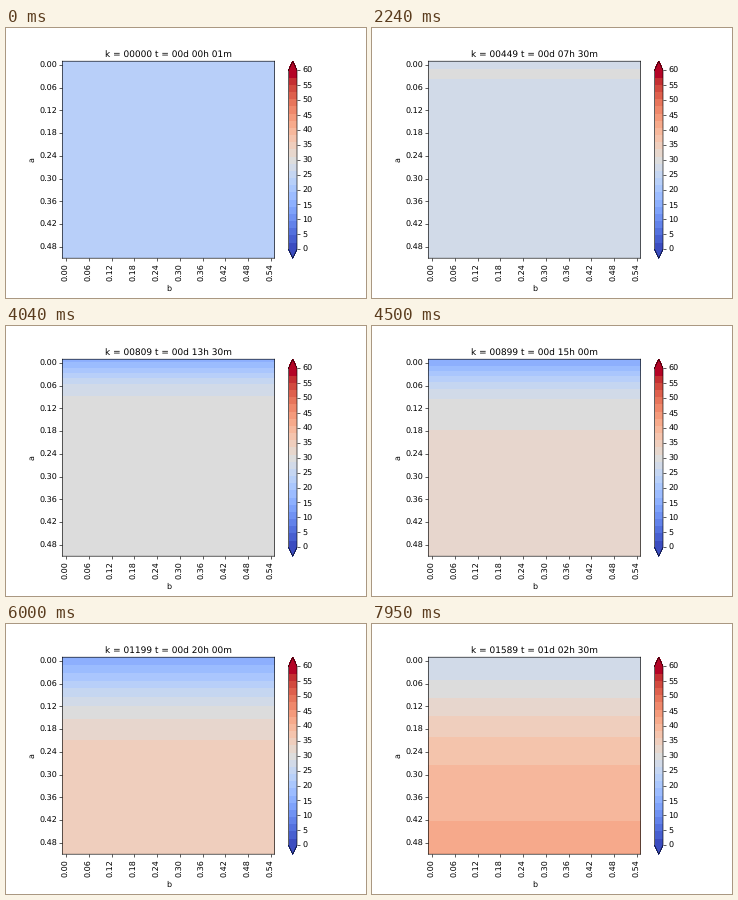
Animation of 360x270 px, one loop 8000 ms. Source, as a matplotlib script:

```python
import numpy as np
import matplotlib.pyplot as plt
from matplotlib.animation import FuncAnimation

WIDTH, HEIGHT, DPI = 360, 270, 56.25
LOOP_MS, FRAME_MS, STEP_MS = 8000, 40, 150
STEPS_PER_DAY, LAST_STEP = 48, 53
TOP, BOTTOM, LEFT, RIGHT = 33.2, 230.2, 56.3, 268.6

depth = np.arange(197) + 0.5


def temperature(step):
    """Self-heating block whose surface follows a daily air temperature."""
    progress = step / LAST_STEP
    start = np.tanh(step / 4)

    inside = 22.85 + 0.2 * step + 0.0026 * step ** 2
    inside = inside + 0.9 * progress ** 2 * depth / depth[-1]

    phase = 2 * np.pi * (step - 10) / STEPS_PER_DAY
    air = 21.5 + 7.5 * np.cos(phase + 0.25 * np.sin(phase))
    reach = 1 + 25 * (step / 30) ** 2
    surface = start * (air - inside[0]) * np.exp(-(depth / reach) ** 1.5)

    # Daytime heat sinks into the block and spreads out
    center = 13 * (step / 15) ** 4
    spread = 1 + 0.6 * center
    wave = start * 56 / (4 + center) * np.exp(-((depth - center) / spread) ** 2)
    return (inside + surface + wave)[:, None]


def title_text(step):
    k = max(0, 30 * step - 1)
    hours, minute = divmod(k + 1, 60)
    day, hour = divmod(hours, 24)
    return f"k = {k:05d} t = {day:02d}d {hour:02d}h {minute:02d}m"


def add_axes(left, right):
    return fig.add_axes([left / WIDTH, 1 - BOTTOM / HEIGHT,
                         (right - left) / WIDTH, (BOTTOM - TOP) / HEIGHT])


plt.rcParams.update({"font.family": "DejaVu Sans", "text.hinting": "none",
                     "text.hinting_factor": 1, "path.snap": False})
fig = plt.figure(figsize=(WIDTH / DPI, HEIGHT / DPI), dpi=DPI,
                 facecolor="white")
ax = add_axes(LEFT, RIGHT)
image = ax.imshow(temperature(0), cmap=plt.get_cmap("coolwarm", 25),
                  vmin=0, vmax=60, aspect="auto", interpolation="nearest",
                  extent=(-0.01, 0.55, 0.51, -0.01))
x_ticks, y_ticks = np.arange(10) * 0.06, np.arange(9) * 0.06
ax.set_xticks(x_ticks, [f"{v:.2f}" for v in x_ticks], rotation=90)
ax.set_yticks(y_ticks, [f"{v:.2f}" for v in y_ticks])
ax.set_xlabel("b")
ax.set_ylabel("a")
title = ax.set_title(title_text(0))
fig.colorbar(image, cax=add_axes(282.5, 291), extend="both", alpha=0.92,
             ticks=range(0, 61, 5))


def update(frame):
    step = (frame * FRAME_MS + 30) // STEP_MS
    image.set_data(temperature(step))
    title.set_text(title_text(step))
    return image, title


animation = FuncAnimation(fig, update, frames=LOOP_MS // FRAME_MS,
                          interval=FRAME_MS, repeat=True, repeat_delay=0)
plt.show()
```
